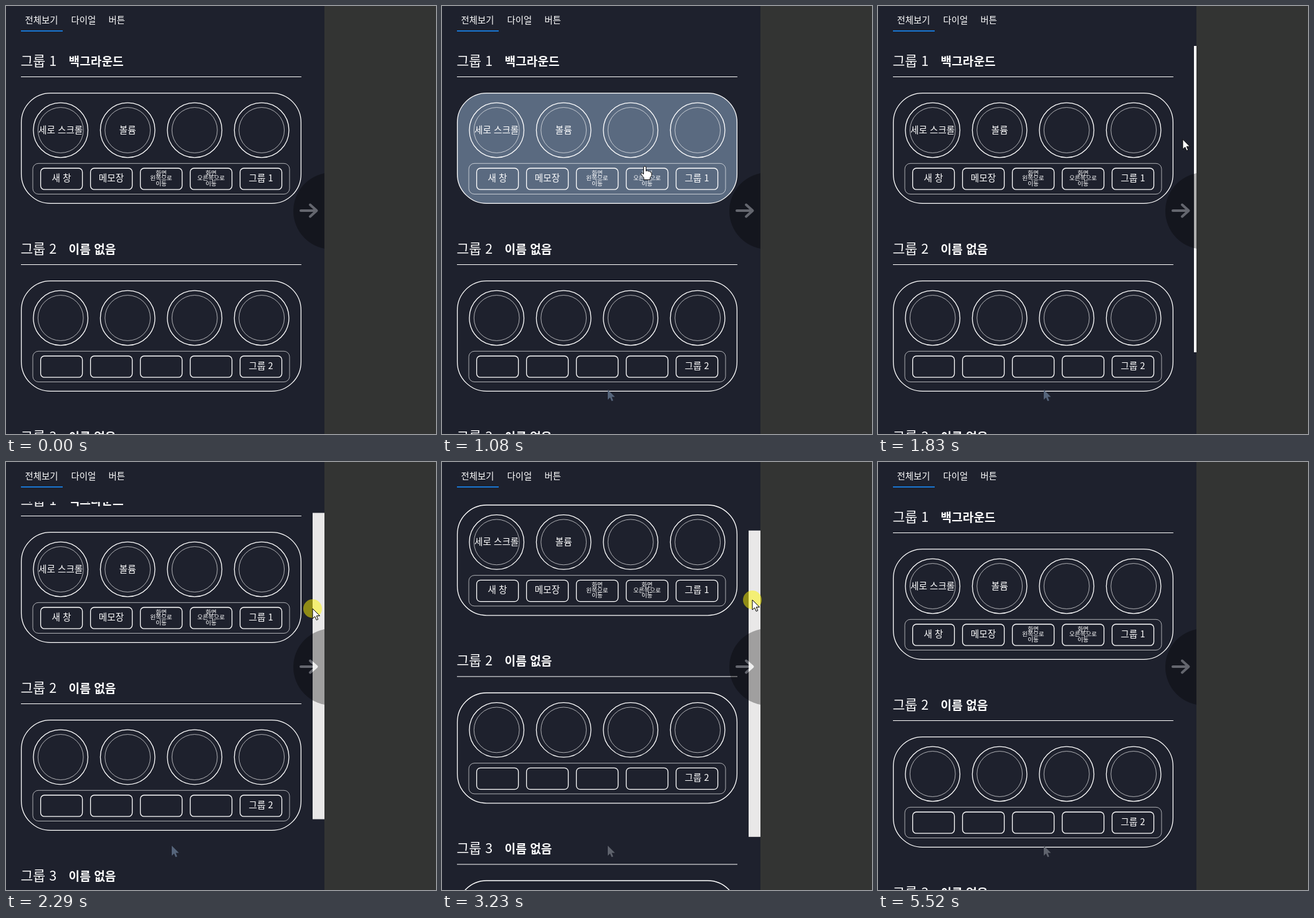
These frames come from a looping animation (690 by 686 pixels, 5910 ms). An HTML page:

```html
<!DOCTYPE html>
<html lang="ko">
<head>
<meta charset="utf-8">
<style>
  html, body { margin: 0; width: 100%; height: 100%; overflow: hidden; background: #333433; }
  svg { display: block; }
  text { fill: #fff; font-family: "Noto Sans CJK KR", "Noto Sans KR", "Noto Sans CJK", sans-serif; }
  .tab { font-size: 14.4px; font-weight: 500; }
  .group { font-size: 21.6px; font-weight: 300; }
  .title { font-size: 19.2px; font-weight: 700; }
  .label { font-size: 14.6px; font-weight: 400; text-anchor: middle; }
  .small { font-size: 9.6px; font-weight: 400; text-anchor: middle; }
  .line { fill: none; stroke: #fff; stroke-width: 1.3; }
  .thin { fill: none; stroke: #fff; stroke-width: .65; }
  .pointer { fill: #fff; stroke: #000; stroke-width: 1; stroke-linejoin: round; }
</style>
</head>
<body>
<svg width="690" height="686" viewBox="0 0 690 686">
  <rect width="511" height="686" fill="#1e212d"/>
  <text class="tab" x="30.5" y="28.4">전체보기</text>
  <text class="tab" x="104.5" y="28.4">다이얼</text>
  <text class="tab" x="164.5" y="28.4">버튼</text>
  <rect x="24" y="39" width="67" height="2" fill="#1976d2"/>
  <svg y="64" width="511" height="622" viewBox="0 64 511 622">
    <g id="list"></g>
    <rect id="thumb" height="491"/>
    <g opacity=".31">
      <circle cx="522.5" cy="328.5" r="61.5"/>
      <path d="M473 328H498M488 318.5L498.500 328 488 337.500" fill="none" stroke="#fff" stroke-width="4" stroke-linecap="round" stroke-linejoin="round"/>
    </g>
  </svg>
  <path id="trail" transform="translate(266 615)"/>
  <g id="cursor">
    <circle id="press" r="15" fill="#fff500" opacity=".5"/>
    <path id="arrow" class="pointer"/>
    <path id="hand" class="pointer" d="M-2 1.500Q0-1 2 1.500V8Q4.500 6 5.500 8.500Q8 7 8.500 9.500Q11 9 11 11.500V15L8.500 19V22H-1.500V19L-6 13Q-6 10-3.500 11.500L-2 13Z"/>
  </g>
</svg>
<script>
const LOOP = 5910, TICK = 67.5, PITCH = 301;
const $ = id => document.getElementById(id);
const show = (el, on) => el.setAttribute('display', on ? 'inline' : 'none');
const set = (el, attrs) => { for (const k in attrs) el.setAttribute(k, attrs[k]); };

const text = (cls, x, y, s) => `<text class="${cls}" x="${x}" y="${y}">${s}</text>`;
const rect = (cls, x, y, w, h, r) =>
  `<rect class="${cls}" x="${x}" y="${y}" width="${w}" height="${h}" rx="${r}"/>`;

function group(i, title, dials, buttons) {
  const name = '그룹 ' + (i + 1);
  let s = text('group', 23.5, 96, name) + text('title', 100.5, 95.6, title) +
    '<path class="line" style="stroke-width:1" d="M24 113.500H474"/>' +
    rect('line card', 24.6, 139.6, 448.8, 176.8, 47) + rect('thin', 43, 252.3, 412, 49.2, 9);
  for (let k = 0; k < 4; k++) {
    const x = 87.7 + 107.5 * k;
    s += `<circle class="line" cx="${x}" cy="199" r="43.8"/><circle class="thin" cx="${x}" cy="199" r="36.4"/>` +
      text('label', x, 203.6, dials[k] || '');
  }
  for (let k = 0; k < 5; k++) {
    const x = 55.6 + 80 * k, lines = (k < 4 ? buttons[k] || '' : name).split('|');
    s += rect('line', x, 260, 67, 34.2, 6);
    lines.forEach((l, j) => s += lines.length > 1
      ? text('small', x + 33.4, 270.5 + 8.7 * j, l)
      : text('label', x + 33.4, 280.6, l));
  }
  return `<g transform="translate(0 ${PITCH * i})">${s}</g>`;
}

$('list').innerHTML =
  group(0, '백그라운드', ['세로 스크롤', '볼륨'], ['새 창', '메모장', '화면|왼쪽으로|이동', '화면|오른쪽으로|이동']) +
  [1, 2, 3].map(i => group(i, '이름 없음', [], [])).join('');
const card = document.querySelector('.card');
for (const id of ['arrow', 'trail'])
  $(id).setAttribute('d', 'M0 0V16L3.700 12.600 6.200 18.300 8.700 17.200 6.300 11.600H11.500Z');

// Keys are [tick, value, ...], interpolated linearly.
const POINTER = [[2, 266, 615], [6, 300, 351], [10, 300, 351], [12, 306, 316], [19, 340, 212], [20, 352, 210],
  [23, 469, 200], [28, 494, 217], [33, 492, 217], [34, 492, 235], [41, 490, 482], [42, 490, 482],
  [43, 490, 446], [48, 498, 221], [58, 498, 221], [63, 612, 309], [79, 612, 309], [81, 594, 660], [82, 590, 700]];
const SCROLL = [[32, 0], [33, 4], [34, 27], [41, 408], [43, 408], [44, 353], [49, 0]];
const HOVER = [[12, 0], [16, 1], [23, 1], [27, 0]];
const THUMB_ALPHA = [[24, 0], [27, 1], [69, 1], [74, 0]];
const THUMB_WIDTH = [[28, 4], [29, 19], [58, 19], [62, 4]];

function at(keys, n, c = 1) {
  const i = keys.findIndex(k => k[0] >= n);
  if (i < 0) return keys[keys.length - 1][c];
  if (i === 0) return keys[0][c];
  const a = keys[i - 1], b = keys[i];
  return a[c] + (b[c] - a[c]) * (n - a[0]) / (b[0] - a[0]);
}

function draw(now) {
  const n = Math.floor((now % LOOP + 20) / TICK);
  const scroll = at(SCROLL, n), width = at(THUMB_WIDTH, n);
  set($('list'), { transform: `translate(0 ${-scroll})` });
  card.style.fill = `rgba(90,106,128,${at(HOVER, n)})`;
  set($('thumb'), {
    x: 511 - width, y: 64 + scroll / 1.54, width,
    opacity: at(THUMB_ALPHA, n), fill: width > 4 ? '#e9e8e8' : '#fff'
  });
  const hand = n >= 13 && n < 25;
  set($('cursor'), { transform: `translate(${at(POINTER, n)} ${at(POINTER, n, 2)})` });
  show($('cursor'), n >= 2 && n < 82);
  show($('hand'), hand);
  show($('arrow'), !hand);
  show($('press'), n >= 33 && n < 54);
  show($('trail'), n >= 3);
  set($('trail'), { fill: n < 36 ? '#56657b' : '#5f636d' });
  requestAnimationFrame(() => draw(performance.now()));
}
draw(0);
</script>
</body>
</html>
```
